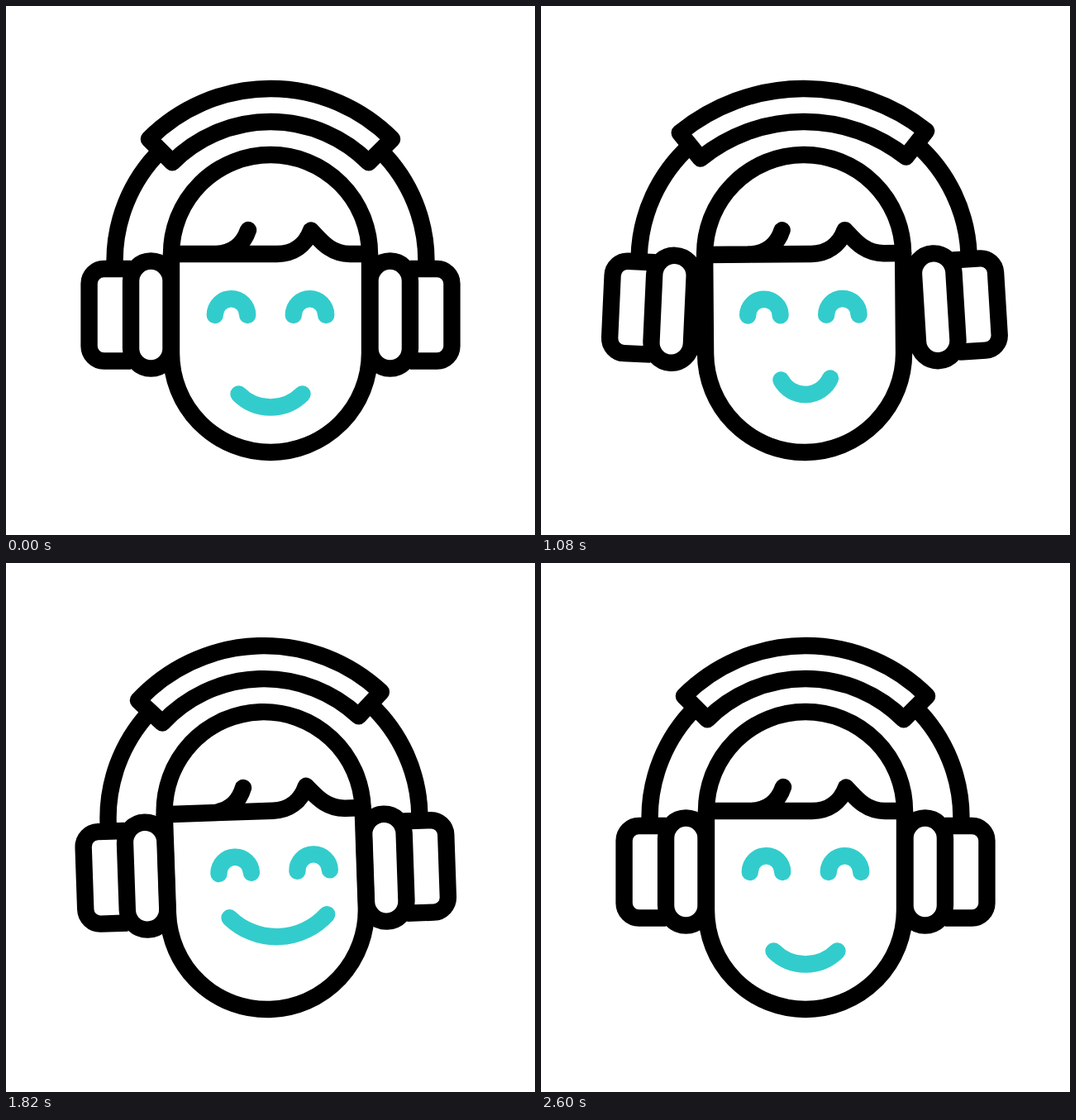
Animation of 640 by 640 pixels, one loop 3000 ms. Source, as an HTML page:

```html
<!DOCTYPE html>
<html lang="en">
<head>
<meta charset="utf-8">
<title>Listening to music</title>
<style>
  html, body { margin: 0; height: 100%; overflow: hidden; background: #fff; }
  svg { display: block; width: 100%; height: 100%; fill: none; stroke: #000; stroke-width: 20.4; stroke-linejoin: round; }
  .round { stroke-linecap: round; }
  .accent { stroke: #33cccc; }
</style>
</head>
<body>
<svg viewBox="0 0 640 640">
  <defs>
    <g id="cup">
      <path d="M187 175A188 188 0 0 0 131.5 312"/>
      <path d="M151 318H118.500a18 18 0 0 0-18 18V411.500a18 18 0 0 0 18 18H151"/>
      <rect x="151" y="308.500" width="48.500" height="130" rx="24.250"/>
    </g>
    <path id="eye" d="M-19.700 0a19.700 19.700 0 0 1 39.400 0"/>
  </defs>
  <g id="head">
    <path d="M200 300A120 120 0 0 1 440 300V420A120 120 0 0 1 200 420Z"/>
    <path id="hair" class="round"/>
    <g id="eyes" class="round accent">
      <use href="#eye" x="272.500" y="374"/>
      <use href="#eye" x="367.500" y="374"/>
    </g>
    <path id="mouth" class="round accent"/>
    <use id="left" href="#cup"/>
    <g transform="matrix(-1 0 0 1 640 0)"><use id="right" href="#cup"/></g>
    <path id="band"/>
  </g>
</svg>
<script>
const LOOP = 3000;
const set = (id, name, value) => document.getElementById(id).setAttribute(name, value);

// Eased value between [time, value] stops
function ease(time, ...stops) {
  const next = stops.findIndex(stop => stop[0] > time);
  if (next < 1) return stops.at(next)[1];
  const [t0, a] = stops[next - 1], [t1, b] = stops[next];
  return a + (b - a) * (1 - Math.cos(Math.PI * (time - t0) / (t1 - t0))) / 2;
}

// Smooth rise and fall from 0 to 1 and back
const pulse = (time, start, end) =>
  time > start && time < end ? Math.sin(Math.PI * (time - start) / (end - start)) ** 2 : 0;

// The band flattens at constant length; the arms swing out from its ends.
function drawHeadphones(open) {
  const angle = (45 - 14.5 * open) * Math.PI / 180;
  const radius = 188 * Math.PI / 4 / angle;
  const point = (r, side) =>
    [320 + side * r * Math.sin(angle), 120 + radius - r * Math.cos(angle)];
  const outer = radius + 20, inner = radius - 20;
  set('band', 'd', `M${point(outer, -1)}A${outer} ${outer} 0 0 1 ${point(outer, 1)}` +
    `L${point(inner, 1)}A${inner} ${inner} 0 0 0 ${point(inner, -1)}Z`);
  const move = `translate(${point(radius, -1)}) rotate(${7 * open}) translate(-187 -175)`;
  set('left', 'transform', move);
  set('right', 'transform', move);
}

// The fringe slides against the tilt while its line stays on the face edges.
function drawHair(shift) {
  set('hair', 'd', `M200 300H${328 + shift}c19 0 34-10 41-28.500c11 11.500 23 28.500 47 28.500H440` +
    `M${293 + shift} 271c-5 15-17 29-41 29`);
}

function drawFace(sway, small, wide) {
  const half = 38.5 - 8.7 * small + 20.5 * wide;
  const depth = 16 + 2.5 * small + 9 * wide;
  const radius = (half * half + depth * depth) / (2 * depth);
  const x = 320 - 6.5 * sway + 13.3 * wide;
  const y = 469.5 - 18 * small - 42 * wide;
  set('eyes', 'transform', `translate(${10 * sway + 10.5 * wide})`);
  set('mouth', 'd', `M${-half} 0A${radius} ${radius} 0 0 0 ${half} 0`);
  set('mouth', 'transform', `translate(${x} ${y}) rotate(${11 * sway})`);
}

function frame() {
  const t = performance.now() % LOOP;
  const tilt = ease(t, [220, 0], [770, -8], [1410, 7.8], [2090, -7], [2600, 0]);
  const sway = ease(t, [220, 0], [680, 1], [820, 1], [1340, -1.25], [1840, 0]);
  const small = ease(t, [220, 0], [680, 1], [1340, 1], [1840, 0]);
  const wide = ease(t, [1340, 0], [1840, 1], [2090, 1], [2600, 0]);
  set('head', 'transform', `rotate(${tilt} 320 540)`);
  drawHeadphones(pulse(t, 220, 780) + 0.45 * pulse(t, 820, 1400));
  drawHair(-1.65 * tilt);
  drawFace(sway, small, wide);
  requestAnimationFrame(frame);
}
frame();
</script>
</body>
</html>
```
